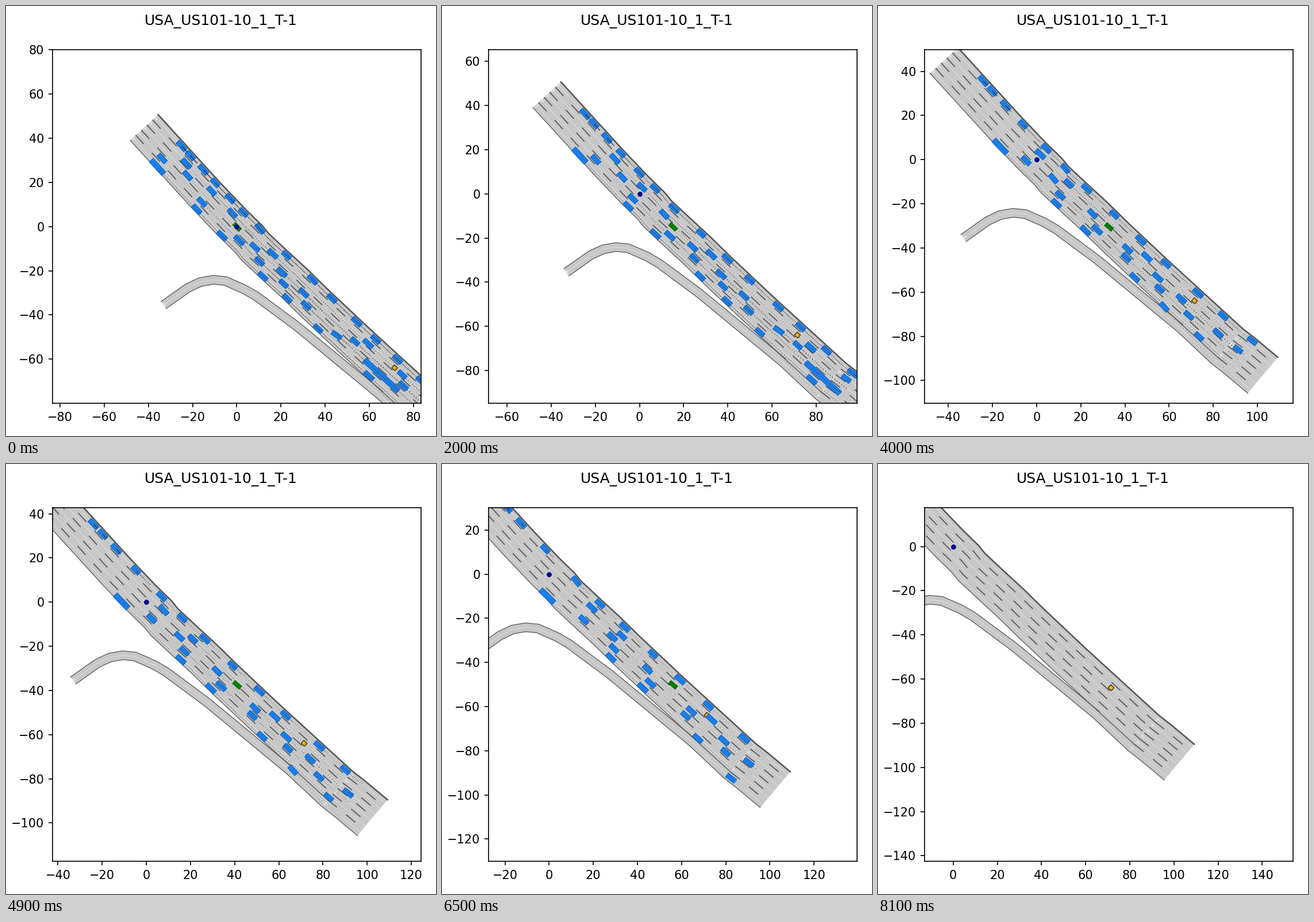
A matplotlib script for the animation above (9100 ms loop, 748 px wide and 748 px high).

```python
import numpy as np
import matplotlib.pyplot as plt
from matplotlib.animation import FuncAnimation
from matplotlib.collections import PolyCollection
from matplotlib.ticker import MultipleLocator

SIZE, DPI = 748, 150
LEFT, RIGHT, TOP, BOTTOM = 81, 722, 76.45, 691
HALF_Y = 80
HALF_X = HALF_Y * (RIGHT - LEFT) / (BOTTOM - TOP)
STEPS, LAST, FRAMES = 82, 80, 91

ROAD, MARK, CENTER = "#c7c7c7", "#555555", "#dddddd"
LANES, ROAD_WIDTH, RAMP_WIDTH = 5, 17.2, 4
SPLIT = 9  # vertex where the second road section starts

steps = np.arange(STEPS)
rng = np.random.default_rng(4)


def offset(line, distance):
    """Parallel line to the right of the direction of travel."""
    dx, dy = np.gradient(line, axis=0).T
    return line + distance * np.column_stack([dy, -dx]) / np.hypot(dx, dy)[:, None]


# Borders, upstream to downstream
upper = np.array([
    (-35.6, 50.7), (-7.7, 20.1), (4.2, 7.6), (11.5, 0.5), (14.4, -3.1),
    (22, -10.2), (32.1, -19.5), (41.5, -28.7), (60, -46.1), (93.5, -76.7),
    (98.8, -80.8), (109.2, -89.5)])
lower = offset(upper, ROAD_WIDTH)
ramp_left = np.vstack([
    [(-34.3, -33.9), (-23.3, -26.1), (-17.1, -23.2), (-10.8, -22.1),
     (-4.6, -22.7), (4.3, -26.6), (10, -29.9), (28.5, -43.6), (66.2, -74.7)],
    lower[SPLIT:]])
ramp_right = offset(ramp_left, RAMP_WIDTH)


def lane_line(v):
    """Polyline v lanes away from the upper border."""
    return upper + (lower - upper) * v / LANES


def headings(path):
    dx, dy = np.gradient(path, axis=0).T
    return np.arctan2(dy, dx)


def box(center, angle, length, width):
    c, s = np.cos(angle), np.sin(angle)
    corners = np.array([(1, 1), (1, -1), (-1, -1), (-1, 1)]) * (length / 2, width / 2)
    return corners @ np.array([(c, s), (-s, c)]) + center


# Distance covered in SPAN steps, by lane and by starting place
SPAN = 65
PLACES = (-36, -15, 0, 15, 30, 80)
TRAVEL = [
    (1, 2.5, 18.5, 26, 23, 46),
    (40, 43.5, 47, 57, 60, 67),
    (49, 52, 54, 58, 60, 69),
    (50, 45, 44, 55, 64, 61),
    (35, 48, 50, 57, 62, 66),
]


class Car:
    """Drives along a lane, or shifts to lane `to` during the steps `when`."""

    def __init__(self, lane, start, length=None, to=None, when=(0, 1)):
        self.length = length or rng.uniform(4.3, 5.3)
        self.width = 2.5 if self.length > 8 else 2.2
        travel = np.interp(start, PLACES, TRAVEL[int(lane)])
        ease = np.clip(0.8 - travel / 65, 0.12, 0.7)  # slow cars pick up speed
        u = steps / SPAN
        x = start + travel * ((1 - ease) * u + ease * u**2)
        lanes = np.interp(steps, when, (lane, lane if to is None else to))
        y = [np.interp(a, *lane_line(v).T) for a, v in zip(x, lanes)]
        self.path = np.column_stack([x, y])
        self.angle = headings(self.path)
        self.shown = x < 97.8 - 2 * lanes + self.length / 4

    def outline(self, t):
        return box(self.path[t], self.angle[t], self.length, self.width)

    def future(self, t):
        ahead = slice(t + 1, LAST + 1)
        return self.path[ahead][self.shown[ahead]]


STARTS = {
    0.5: (-25, -21, -15.2, -9.8, -3, 3, 10.5, 22.5, 34.3, 43.1, 54.3, 62.9, 72.8, 83.5),
    1.58: (-22.8, -11.4, 16.3, 59.5, 74.9),
    2.55: (-22.3, 8.2, 20.4, 30.3, 53.5, 75.4),
    3.5: (-33.8, -15.8, 1.1, 10.3, 21.2, 31.4),
    4.65: (-18.1, -6.7, 11.8, 36.8, 59.8),
}
cars = [Car(lane, x) for lane, row in STARTS.items() for x in row]
cars += [
    Car(3.5, 65.5, length=20.8),
    Car(4.7, -35.9, length=8.4),
    Car(1.6, -2, to=2.45, when=(4, 42)),
    Car(3.6, 45.2, to=2.62, when=(0, 24)),
    Car(4.6, 22.8, to=5.6, when=(33, 60)),
]

ego_keys = (0, 8, 20, 31, 49, 65, 80)
ego_x = (0, 5.63, 15, 24.6, 41, 56, 70.5)
ego_y = (0, -5.73, -14.85, -23.3, -37.35, -50.05, -62.5)
ego_path = np.column_stack(
    [np.polyval(np.polyfit(ego_keys, p, 4), steps) for p in (ego_x, ego_y)])
ego_angle = headings(ego_path)

fig = plt.figure(figsize=(SIZE / DPI, SIZE / DPI), dpi=DPI, facecolor="white")
ax = fig.add_axes([LEFT / SIZE, 1 - BOTTOM / SIZE,
                   (RIGHT - LEFT) / SIZE, (BOTTOM - TOP) / SIZE])
fig.suptitle("USA_US101-10_1_T-1", fontsize=12)
for axis in (ax.xaxis, ax.yaxis):
    axis.set_major_locator(MultipleLocator(20))


def stroke(points, color, width, z, dashed=False):
    style = (0, (10 / width, 10 / width)) if dashed else "-"
    ax.plot(*points.T, color=color, lw=width, ls=style, zorder=z)


def surface(left, right):
    ax.fill(*np.vstack([left, right[::-1]]).T, color=ROAD, lw=0, zorder=1)


def flow_arrow(line, i):
    d = line[i + 1] - line[i]
    d = d / np.hypot(*d)
    n = np.array([-d[1], d[0]])
    tip = [line[i] + n, line[i] - n, line[i] + 1.7 * d]
    ax.fill(*np.transpose(tip), color=CENTER, lw=0, zorder=1.2)


def draw_roads():
    surface(ramp_left, ramp_right)
    surface(upper, lower)
    ramp_mid = (ramp_left + ramp_right) / 2
    for line in [lane_line(i + 0.5) for i in range(LANES)] + [ramp_mid]:
        stroke(line, CENTER, 0.5, 1.1)
        flow_arrow(line, 0)
        flow_arrow(line, SPLIT)
    for i in range(1, LANES):
        line = lane_line(i)
        stroke(line[:SPLIT + 1], MARK, 0.8, 1.3, dashed=True)
        stroke(line[SPLIT:], MARK, 0.8, 1.3, dashed=True)
    stroke(upper, MARK, 1.2, 1.3)
    stroke(lower[:SPLIT + 1], MARK, 0.6, 1.3)
    stroke(lower[SPLIT:], MARK, 0.8, 1.3, dashed=True)
    stroke(ramp_left[:SPLIT], MARK, 0.6, 1.3)
    stroke(ramp_right, MARK, 0.6, 1.3)


draw_roads()
goal = box((71.5, -63.95), np.radians(-42), 2, 1.8)
ax.fill(*goal.T, facecolor="#f1b514", edgecolor="#302404", lw=0.6, zorder=2)
ax.plot(0, 0, "o", color="#00008b", ms=4.2, mew=0, zorder=2.4)

traffic = PolyCollection([], facecolor="#1d7eea", edgecolor="#0066cc", lw=0.5, zorder=2.1)
ego = PolyCollection([], facecolor="#008000", edgecolor="#006400", lw=0.5, zorder=2.3)
ax.add_collection(traffic, autolim=False)
ax.add_collection(ego, autolim=False)
trails, = ax.plot([], [], "o", color="#333333", ms=0.55, mew=0, alpha=0.75, zorder=2.2)


def draw(frame):
    t = min(frame, LAST)
    x, y = ego_path[t]
    ax.set_xlim(x - HALF_X, x + HALF_X)
    ax.set_ylim(y - HALF_Y, y + HALF_Y)
    active = [c for c in cars if c.shown[t]] if frame <= LAST else []
    traffic.set_verts([c.outline(t) for c in active])
    ego.set_verts([box(ego_path[t], ego_angle[t], 4, 1.8)] if active else [])
    dots = np.vstack([np.empty((0, 2))] + [c.future(t) for c in active])
    trails.set_data(dots[:, 0], dots[:, 1])
    return traffic, ego, trails


anim = FuncAnimation(fig, draw, frames=FRAMES, interval=100, repeat=True,
                     repeat_delay=0, init_func=lambda: draw(0), blit=False)
plt.show()
```
